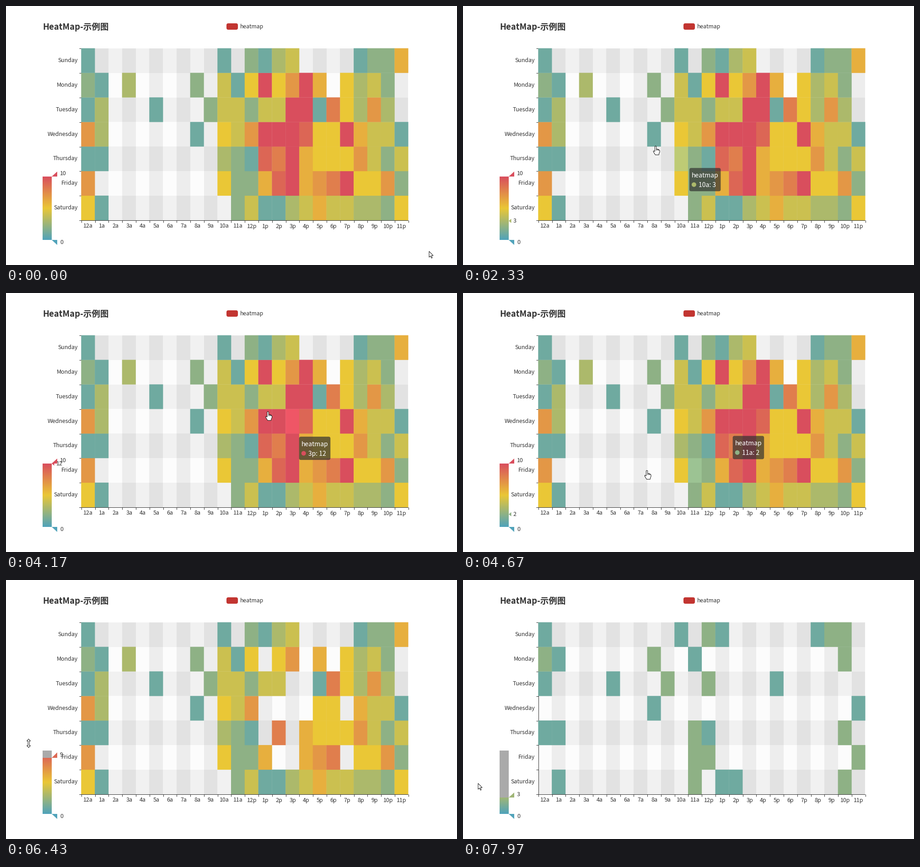
Animation, 986 px wide and 568 px high, one loop 8 s. Source, as a matplotlib script:

```python
import numpy as np
import matplotlib.pyplot as plt
from matplotlib.animation import FuncAnimation
from matplotlib.collections import PatchCollection
from matplotlib.patches import Circle, FancyBboxPatch, PathPatch, Polygon, Rectangle
from matplotlib.path import Path

WIDTH, HEIGHT, DPI = 986, 568, 64
FRAMES, INTERVAL = 200, 40
plt.rcParams["font.family"] = ["Noto Sans CJK JP", "DejaVu Sans"]

LEFT, RIGHT, TOP, BOTTOM = 164.5, 879.4, 92.8, 469.8
COL_W, ROW_H = (RIGHT - LEFT) / 24, (BOTTOM - TOP) / 7
BAR_L, BAR_R, BAR_TOP, BAR_BOTTOM = 80, 100, 374, 513
INK = "#333333"

DAYS = ["Saturday", "Friday", "Thursday", "Wednesday", "Tuesday", "Monday", "Sunday"]
HOURS = [f"{h % 12 or 12}{'a' if h < 12 else 'p'}" for h in range(24)]

# The charted values of each day, as runs keyed by their first hour.
RUNS = [
    {0: [5, 1], 11: [2, 4, 1, 1, 3, 4, 6, 4, 4, 3, 3, 2, 5]},
    {0: [7], 10: [5, 2, 2, 6, 9, 11, 6, 7, 8, 12, 5, 5, 7, 2]},
    {0: [1, 1], 10: [3, 2, 1, 9, 8, 10, 6, 5, 5, 5, 7, 4, 2, 4]},
    {0: [7, 3], 8: [1], 10: [5, 4, 7, 14, 13, 12, 9, 5, 5, 10, 6, 4, 4, 1]},
    {0: [1, 3], 5: [1], 9: [2, 4, 4, 2, 4, 4, 14, 12, 1, 8, 5, 3, 7, 3]},
    {0: [2, 1], 3: [3], 8: [2], 10: [4, 1, 5, 10, 5, 7, 11, 6], 19: [5, 3, 4, 2]},
    {0: [1], 10: [1], 12: [2, 1, 3, 4], 20: [1, 2, 2, 6]},
]
CELLS = {(first + k, row): v for row, runs in enumerate(RUNS)
         for first, run in runs.items() for k, v in enumerate(run)}
KEYS, VALUES = list(CELLS), np.array(list(CELLS.values()))

# Stops of the pointer: time in ms, x, y. It eases from each to the next.
STOPS = [
    (30, 925, 538), (430, 648, 569), (770, 585, 566), (1300, 92, 282),
    (1530, 102, 340), (1700, 102, 340), (2120, 421, 307), (2500, 421, 307),
    (3150, 546, 279), (3430, 546, 279), (4170, 573, 262), (4360, 556, 194),
    (4670, 402, 389), (5030, 400, 396), (5200, 95, 397), (5440, 55, 336),
    (5730, 55, 336), (5800, 53, 343), (6170, 53, 343), (7030, 37, 412),
    (7830, 35, 439.5), (7970, 33, 446),
]
POINTER_SHIFT = np.array([56, 28])   # the page reacts this far from the drawn pointer
REACTION, HIDE_DELAY, FOLLOW = 100, 100, .18
HOVER_BAR, DRAG, RELEASE = 5750, 6170, 7860
GRIP = 31.4                          # range end below the pointer while dragging

ARROW = [(0, 0), (0, 13), (3, 10.3), (5.2, 15), (7, 14.2), (5, 9.6), (9, 9.3)]
HALF_RESIZE = [(0, -9.5), (4, -5), (1.5, -5), (1.5, 5), (4, 5)]
HAND = [(-1.5, 1), (0, 0), (1.7, 1), (1.7, 6.5), (6.3, 7.5), (9, 10), (9, 13.5),
        (7.5, 16.5), (7.2, 19.5), (-.5, 19.5), (-4.8, 12.5), (-4.5, 10.5), (-1.5, 12)]


def closed(points):
    return Path(points + points[:1], closed=True)


CURSORS = {
    "arrow": closed(ARROW),
    "resize": closed(HALF_RESIZE + [(-x, -y) for x, y in HALF_RESIZE]),
    "hand": Path.make_compound_path(
        closed(HAND), *[Path([(x, 7), (x, 10)]) for x in (1.7, 4.1, 6.5)]),
}


def color_at(values):
    stops = np.array([(80, 163, 186), (234, 199, 54), (217, 78, 93)]) / 255
    return np.stack([np.interp(values, [0, 5, 10], c) for c in stops.T], axis=-1)


def bar_y(value):
    return BAR_BOTTOM - (BAR_BOTTOM - BAR_TOP) * min(value, 10) / 10


def frame_time(i):
    return i * INTERVAL + 30


def pointer(t):
    for (t0, *a), (t1, *b) in zip(STOPS, STOPS[1:]):
        if t < t1:
            break
    f = np.clip((t - t0) / (t1 - t0), 0, 1)
    return np.array(a) + (np.array(b) - a) * f * f * (3 - 2 * f)


def range_limit(t):
    if t < DRAG:
        return 10
    y = pointer(t)[1] + GRIP
    return min(10, 10 * (BAR_BOTTOM - y) / (BAR_BOTTOM - BAR_TOP))


def hovered(t):
    """Data cell under the page's pointer, with the pointer position."""
    pos = pointer(t - REACTION) + POINTER_SHIFT
    key = (int((pos[0] - LEFT) // COL_W), int((BOTTOM - pos[1]) // ROW_H))
    return (key if key in CELLS and t < HOVER_BAR else None), pos


def tooltip_track():
    """Per frame: hovered cell, cell in the tooltip (or None), tooltip corner."""
    track, shown, corner, last = [], None, None, 0
    for t in map(frame_time, range(FRAMES)):
        key, pos = hovered(t)
        if key:
            corner = pos + 20 if shown is None else corner + (pos + 20 - corner) * FOLLOW
            shown, last = key, t
        elif t - last > HIDE_DELAY:
            shown = None
        track.append((key, shown, corner))
    return track


fig = plt.figure(figsize=(WIDTH / DPI, HEIGHT / DPI), dpi=DPI, facecolor="white")
ax = fig.add_axes([0, 0, 1, 1])


def add(patch, z):
    patch.set_zorder(z)
    return ax.add_patch(patch)


def label(x, y, s, size=12.4, ha="left", color=INK, z=1.5, **kw):
    return ax.text(x, y, s, fontsize=size * 72 / DPI, ha=ha, va="baseline",
                   color=color, zorder=z, **kw)


def line(x, y):
    ax.plot(x, y, color=INK, lw=72 / DPI, solid_capstyle="butt", zorder=1)


def rounded(x, y, w, h, color, z, **kw):
    return add(FancyBboxPatch((x, y), w, h, boxstyle="round,pad=0,rounding_size=4",
                              fc=color, lw=0, **kw), z)


def triangle(points, color, z):
    return add(Polygon(points, closed=True, fc=color, lw=0), z)


def band(x, y, w, h, dark, z):
    shade = (200 if dark else 250) / 255
    add(Rectangle((x, y), w, h, fc=(shade,) * 3, alpha=.3, lw=0), z)


# Title and legend
label(80.5, 52, "HeatMap-示例图", 18.5, fontweight="bold")
rounded(482, 38, 25, 14, "#c23531", 2)
label(512, 48.5, "heatmap", 12.1)

# Split areas, axes and axis labels
for row, day in enumerate(DAYS):
    y = BOTTOM - (row + 1) * ROW_H
    band(LEFT, y, RIGHT - LEFT, ROW_H, row % 2 == 0, 0)
    label(157, y + ROW_H / 2 + 3.2, day, ha="right")
for col, hour in enumerate(HOURS):
    x = LEFT + col * COL_W
    band(x, TOP, COL_W, BOTTOM - TOP, col % 2 == 1, .5)
    label(x + COL_W / 2 + .4, 486.5, hour, ha="center")
line([164.5, 164.5], [TOP, BOTTOM])
line([160, RIGHT], [469.7, 469.7])
for k in range(8):
    line([160, 165], [TOP + k * ROW_H + .3] * 2)
for k in range(25):
    line([LEFT + k * COL_W + .3] * 2, [BOTTOM, BOTTOM + 5])

BLEED = .15   # softens the seams between neighbouring cells
cells = PatchCollection(
    [Rectangle((LEFT + c * COL_W - BLEED, BOTTOM - (r + 1) * ROW_H - BLEED),
               COL_W + 2 * BLEED, ROW_H + 2 * BLEED) for c, r in KEYS],
    linewidth=0, antialiased=True, zorder=2)
cells.set_snap(False)
ax.add_collection(cells)

# Visual map
ax.imshow(color_at(np.linspace(10, 0, 139))[:, None, :], aspect="auto", zorder=4,
          extent=(BAR_L, BAR_R, BAR_BOTTOM, BAR_TOP))
off_range = add(Rectangle((BAR_L, BAR_TOP), BAR_R - BAR_L, 0, fc="#aaaaaa", lw=0), 4.1)
triangle([(100, 512.5), (112, 512.5), (112, 524)], color_at(0), 4.2)
label(118, 521.5, "0", z=4.3)
handle = triangle([(0, 0)] * 3, "k", 4.2)
handle_text = label(118, 0, "", z=4.3)
mark = triangle([(0, 0)] * 3, "k", 5)
mark_text = label(109.5, 0, "", z=5)

# Tooltip and pointer
tip_box = rounded(0, 0, 68.5, 51, (50 / 255,) * 3, 8, alpha=.7)
tip_head = label(0, 0, "heatmap", 13.9, color="white", z=8.1)
tip_dot = add(Circle((0, 0), 5, lw=0), 8.1)
tip_text = label(0, 0, "", 13.9, color="white", z=8.1)
cursor = add(PathPatch(CURSORS["arrow"], fc="white", ec="black", lw=1.0), 9)

ax.set_xlim(0, WIDTH)
ax.set_ylim(HEIGHT, 0)
ax.axis("off")
TRACK = tooltip_track()


def draw_cells(t, key, limit):
    rgba = np.ones((len(KEYS), 4))
    rgba[:, :3] = color_at(VALUES)
    lit = np.array([k == key for k in KEYS])
    if HOVER_BAR <= t < DRAG:
        lit |= VALUES >= 10
    rgba[lit, :3] = np.minimum(rgba[lit, :3] * 1.1, 1)
    if limit < 10:
        rgba[VALUES > limit, 3] = 0
    cells.set_facecolor(rgba)


def draw_range(limit):
    y = bar_y(limit)
    off_range.set_height(y - BAR_TOP)
    handle.set_xy([(100, y), (112, y), (112, y - 11.5)])
    handle.set_facecolor(color_at(limit))
    handle_text.set_text(f"{limit:.0f}")
    handle_text.set_y(y - 3)


def draw_tooltip(shown, corner):
    for part in (mark, mark_text, tip_box, tip_head, tip_dot, tip_text):
        part.set_visible(shown is not None)
    if shown is None:
        return
    value = CELLS[shown]
    color = color_at(value)
    y = bar_y(value)
    mark.set_xy([(100, y), (105.5, y - 4.5), (105.5, y + 4.5)])
    mark.set_facecolor(color)
    mark_text.set_text(str(value))
    mark_text.set_y(y + 4)
    x, y = corner
    tip_box.set_x(x)
    tip_box.set_y(y)
    tip_head.set_position((x + 5, y + 20.5))
    tip_dot.set_center((x + 10, y + 36.5))
    tip_dot.set_facecolor(color)
    tip_text.set_position((x + 20, y + 41.5))
    tip_text.set_text(f"{HOURS[shown[0]]}: {value}")


def update(i):
    t = frame_time(i)
    key, shown, corner = TRACK[i]
    limit = range_limit(t)
    draw_cells(t, key, limit)
    draw_range(limit)
    draw_tooltip(shown, corner)
    kind = "resize" if HOVER_BAR <= t < RELEASE else "hand" if key else "arrow"
    shape = CURSORS[kind]
    cursor.set_path(Path(shape.vertices + pointer(t), shape.codes))
    return []


animation = FuncAnimation(fig, update, frames=FRAMES, interval=INTERVAL,
                          init_func=lambda: update(0), repeat=True, repeat_delay=0)
plt.show()
```
